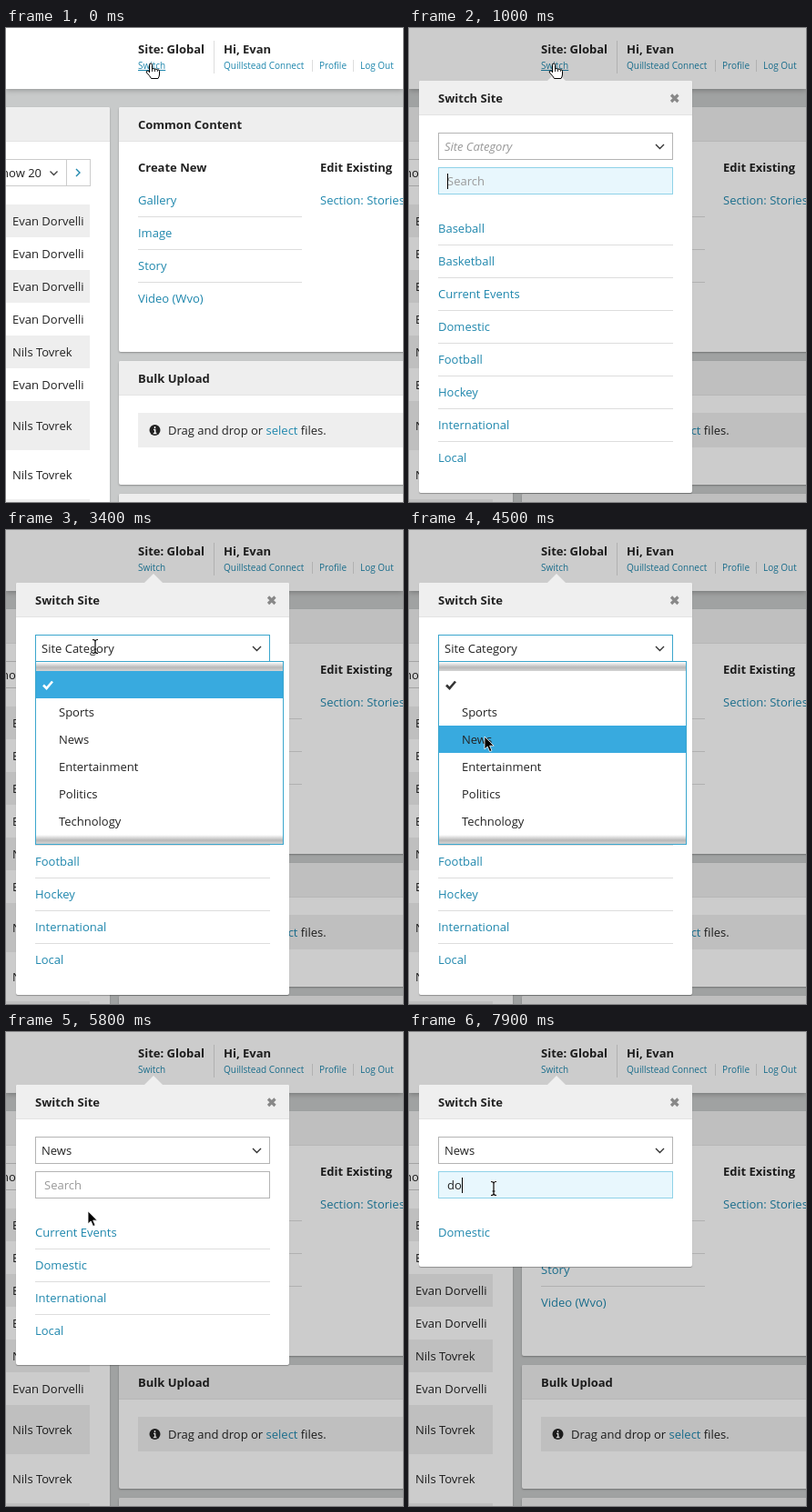
Write an HTML page that moves like this. It is 436 px wide and 521 px high and loops after 8 s.

```html
<!DOCTYPE html>
<html lang="en">
<head>
<meta charset="utf-8">
<title>Switch Site</title>
<style>
:root { --link: #1f87ad; --ink: #222; --grey: #eee; --line: #ddd; --blue: #38aadf; --pale: #e8f7fd; }
* { box-sizing: border-box; }
html, body { margin: 0; width: 100%; height: 100%; overflow: hidden; }
#stage { position: relative; width: 436px; height: 521px; overflow: hidden; background: #c8caca;
  font: 13px/18px "Open Sans", sans-serif; color: var(--ink); white-space: nowrap; }
#stage div, #stage ul, .t, svg { position: absolute; }
svg { left: 0; top: 0; overflow: visible; }
ul { margin: 0; padding: 0; list-style: none; }

/* text placed by left edge and middle line */
.t { left: calc(var(--x) * 1px); top: calc(var(--y) * 1px - 9px); }
.small { font-size: 10px; }
.link, .rows { color: var(--link); }
.rule { width: 1px; background: var(--line); }

.top { left: 0; top: 0; width: 436px; height: 67px; background: #fff; box-shadow: 0 1px 6px rgba(0,0,0,.3); }
.panel { background: #fff; border-radius: 2px; box-shadow: 0 1px 2px rgba(0,0,0,.3); overflow: hidden; }
.panel::before { content: ""; display: block; height: 37px; background: var(--grey); border-bottom: 1px solid #e4e4e4; }
.pager { top: 144px; height: 30px; border: 1px solid #ccc; background: #fff; }
.drop { left: 145px; top: 423px; width: 310px; height: 38px; background: var(--grey); }

.rows li { height: 36px; line-height: 34px; border-bottom: 1px solid var(--line); }
.rows li:last-child { border: 0; }
.people { left: -20px; top: 194px; width: 112px; }
.people li { height: 36px; line-height: 36px; padding-left: 27px; }
.people li:nth-child(odd) { background: var(--grey); }
.people li:nth-child(n+7) { height: 54px; line-height: 54px; }

.s { animation: 8s step-end infinite; }
.shade { inset: 0; background: #000; animation: shade 8s linear infinite; }
.pop { left: 11px; top: 58px; width: 300px; background: #fff; border-radius: 2px;
  box-shadow: 0 1px 1px rgba(0,0,0,.3); animation-name: pop; }
.ui { inset: 0; animation-name: ui; }
.head { left: 11px; top: 58px; width: 300px; height: 38px; background: #efefef;
  border-bottom: 1px solid #e3e3e3; border-radius: 2px 2px 0 0; }
.tip { left: 152px; top: 48px; border: 10px solid transparent; border-top: 0; border-bottom-color: #efefef; }
.field { left: 32px; width: 258px; height: 30px; border: 1px solid #b4b4b4; background: #fff; }
.sites { left: 32px; top: 203px; width: 258px; }
.glow { left: 11px; top: 203px; width: 300px; height: 35px; background: var(--pale); animation-name: glow; }

.menu { left: 32px; top: 144px; width: 273px; height: 202px; border: 1px solid #3ba6cd; background: #fff; animation-name: menu; }
.menu ul { top: 10px; width: 271px; }
.menu li { height: 30px; line-height: 30px; padding-left: 25px; }
.edge { left: 0; width: 271px; height: 10px; background: linear-gradient(#fff, #b8b8b8 60%, #d4d4d4); }
.pick { left: 0; top: 10px; width: 271px; height: 30px; background: var(--blue); animation-name: pick; }
.caret { left: 42px; top: 160px; width: 1px; height: 17px; background: #000; animation-name: caret; }
.cursor { left: 0; top: 0; animation: move 8s linear infinite; }

@keyframes shade { 0%, 1% { opacity: 0 } 3.75%, 100% { opacity: .2 } }
@keyframes pop {
  0% { visibility: hidden; height: 42px } 2.4% { visibility: visible; height: 42px }
  7.4% { visibility: visible; height: 453px } 59.9% { visibility: visible; height: 308px }
  91.1%, 100% { visibility: visible; height: 200px }
}
@keyframes close { 0% { opacity: 0 } 2.4%, 100% { opacity: 1 } }
@keyframes ui { 0% { opacity: 0 } 7.4%, 100% { opacity: 1 } }
@keyframes under { 0% { text-decoration: underline } 13%, 100% { text-decoration: none } }
@keyframes all { 0% { opacity: 1 } 59.9%, 100% { opacity: 0 } }
@keyframes news { 0% { opacity: 0 } 59.9% { opacity: 1 } 91.1%, 100% { opacity: 0 } }
@keyframes found { 0% { opacity: 0 } 91.1%, 100% { opacity: 1 } }
@keyframes glow { 0% { opacity: 0 } 59.9% { opacity: 1 } 71.1%, 100% { opacity: 0 } }
@keyframes select { 0% { border-color: #b4b4b4 } 34.9% { border-color: #3ba6cd } 57.4%, 100% { border-color: #b4b4b4 } }
@keyframes focus {
  0% { background: var(--pale); border-color: #8fd2e8 } 34.9% { background: #fff; border-color: #b4b4b4 }
  79.9%, 100% { background: var(--pale); border-color: #8fd2e8 }
}
@keyframes hint { 0% { opacity: 1; font-style: italic; color: #999 } 34.9% { opacity: 1; font-style: normal; color: #222 } 57.4%, 100% { opacity: 0 } }
@keyframes value { 0% { opacity: 0 } 57.4%, 100% { opacity: 1 } }
@keyframes menu { 0% { opacity: 0 } 36.1% { opacity: 1 } 57.4%, 100% { opacity: 0 } }
@keyframes pick { 0% { top: 10px } 49.9% { top: 40px } 52.4%, 100% { top: 70px } }
@keyframes tick { 0% { stroke: #fff } 49.9%, 100% { stroke: #333 } }
@keyframes prompt { 0% { opacity: 1 } 86.1%, 100% { opacity: 0 } }
@keyframes d { 0% { opacity: 0 } 86.1%, 100% { opacity: 1 } }
@keyframes o { 0% { opacity: 0 } 88.6%, 100% { opacity: 1 } }
@keyframes caret {
  0% { opacity: 1; left: 42px } 13.7% { opacity: 0; left: 42px } 20% { opacity: 1; left: 42px }
  26.2% { opacity: 0; left: 42px } 32.5% { opacity: 1; left: 42px } 34.9% { opacity: 0; left: 42px }
  79.9% { opacity: 1; left: 42px } 86.1% { opacity: 1; left: 50px } 88.6%, 100% { opacity: 1; left: 58px }
}
@keyframes move {
  0% { transform: translate(159px, 39px) }
  12.5% { transform: translate(159px, 39px); animation-timing-function: ease-in-out }
  25% { transform: translate(93px, 167px) }
  28.75% { transform: translate(93px, 167px); animation-timing-function: ease-in-out }
  33.75% { transform: translate(98px, 128px) }
  45.6% { transform: translate(98px, 128px); animation-timing-function: ease-in-out }
  54% { transform: translate(83px, 227px) }
  68.75% { transform: translate(83px, 227px); animation-timing-function: ease-in }
  72.5% { transform: translate(90px, 197px); animation-timing-function: ease-out }
  76.25%, 100% { transform: translate(93px, 172px) }
}
@keyframes hand { 0% { opacity: 1 } 13% { opacity: 0 } 58.7% { opacity: 1 } 71.1%, 100% { opacity: 0 } }
@keyframes arrow {
  0% { opacity: 0 } 13% { opacity: 1 } 33% { opacity: 0 } 46.1% { opacity: 1 }
  58.7% { opacity: 0 } 71.1% { opacity: 1 } 75.6%, 100% { opacity: 0 }
}
@keyframes beam {
  0% { opacity: 0 } 33% { opacity: 1 } 46.1% { opacity: 0 } 75.6% { opacity: 1 }
  85.5% { opacity: 0 } 96.1%, 100% { opacity: 1 }
}
</style>
</head>
<body>
<div id="stage">
  <div class="panel" style="left:-20px;top:87px;width:134px;height:460px"></div>
  <div class="panel" style="left:124px;top:87px;width:340px;height:269px"></div>
  <div class="panel" style="left:124px;top:366px;width:340px;height:136px"></div>
  <div class="panel" style="left:124px;top:512px;width:340px;height:60px"></div>

  <div class="pager" style="left:-30px;width:97px"></div>
  <div class="pager" style="left:66px;width:27px"></div>
  <span class="t" style="--y:159;right:397px">Show 20</span>
  <ul class="people">
    <li>Evan Dorvelli<li>Evan Dorvelli<li>Evan Dorvelli<li>Evan Dorvelli
    <li>Nils Tovrek<li>Evan Dorvelli<li>Nils Tovrek<li>Nils Tovrek<li>
  </ul>

  <b class="t" style="--x:145;--y:106">Common Content</b>
  <b class="t" style="--x:145;--y:153">Create New</b>
  <b class="t" style="--x:345;--y:153">Edit Existing</b>
  <ul class="rows" style="left:145px;top:172px;width:180px">
    <li>Gallery<li>Image<li>Story<li>Video (Wvo)
  </ul>
  <span class="t link" style="--x:345;--y:189">Section: Stories</span>
  <b class="t" style="--x:145;--y:385">Bulk Upload</b>
  <div class="drop"></div>
  <span class="t" style="--x:178;--y:442">Drag and drop or <span class="link">select</span> files.</span>

  <div class="top">
    <b class="t" style="--x:145;--y:23">Site: Global</b>
    <span class="t small link s" style="--x:145;--y:41;animation-name:under">Switch</span>
    <div class="rule" style="left:228px;top:14px;height:36px"></div>
    <b class="t" style="--x:239;--y:23">Hi, Evan</b>
    <span class="t small link" style="--x:239;--y:41">Quillstead Connect</span>
    <div class="rule" style="left:336px;top:35px;height:13px"></div>
    <span class="t small link" style="--x:344;--y:41">Profile</span>
    <div class="rule" style="left:381px;top:35px;height:13px"></div>
    <span class="t small link" style="--x:389;--y:41">Log Out</span>
  </div>
  <svg width="436" height="521" fill="none" stroke-width="1.4">
    <path d="M48.5 157.500l4 4 4-4" stroke="#444"/>
    <path d="M77 155l4 4-4 4" stroke="#1f87ad"/>
    <circle cx="163.500" cy="442" r="6" fill="#222"/>
    <path d="M163.500 438v2M162 441.500h1.700v4M161.800 445.500h3.600" stroke="#fff"/>
  </svg>

  <div class="shade"></div>
  <div class="pop s"></div>
  <div class="ui s">
    <div class="tip"></div>
    <div class="head"></div>
    <b class="t" style="--x:32;--y:77">Switch Site</b>
    <div class="field s" style="top:115px;animation-name:select"></div>
    <span class="t s" style="--x:39;--y:130;animation-name:hint">Site Category</span>
    <span class="t s" style="--x:39;--y:130;animation-name:value">News</span>
    <div class="field s" style="top:153px;animation-name:focus"></div>
    <span class="t s" style="--x:42;--y:168;color:#999;animation-name:prompt">Search</span>
    <span class="t" style="--x:42;--y:168"><span class="s" style="animation-name:d">d</span><span class="s" style="animation-name:o">o</span></span>
    <div class="caret s"></div>
    <svg width="436" height="521" fill="none"><path d="M271 128l4.500 4.500 4.500-4.500" stroke="#333" stroke-width="1.400"/></svg>

    <div class="glow s"></div>
    <ul class="rows sites s" style="animation-name:all">
      <li>Baseball<li>Basketball<li>Current Events<li>Domestic<li>Football<li>Hockey<li>International<li>Local
    </ul>
    <ul class="rows sites s" style="animation-name:news">
      <li>Current Events<li>Domestic<li>International<li>Local
    </ul>
    <ul class="rows sites s" style="animation-name:found"><li>Domestic</ul>

    <div class="menu s">
      <div class="edge" style="top:0"></div>
      <div class="pick s"></div>
      <ul><li><li>Sports<li>News<li>Entertainment<li>Politics<li>Technology</ul>
      <div class="edge" style="bottom:0"></div>
      <svg width="30" height="40" fill="none"><path class="s" style="animation-name:tick" d="M8 25.500l3.500 3.500 6.500-7.500" stroke-width="2.600"/></svg>
    </div>
  </div>
  <svg class="s" style="animation-name:close" width="436" height="521"><path d="M288 73.500l7.500 7.500m0-7.500l-7.500 7.500" stroke="#888" stroke-width="3.200"/></svg>

  <div class="cursor">
    <svg class="s" style="animation-name:hand" width="1" height="1" fill="#fff" stroke="#000">
      <path d="M-1.500 10V1.500a1.500 1.500 0 0 1 3 0V6q1.500-1.200 3 .4 1.600-1 2.800.5 2-.6 2.200 1.300V12q0 2-1.500 4.500H.5Q-1 13.500-4.600 10q-.8-1.600.8-2 1.200 0 2.300 1.600z"/>
      <path d="M1.500 6v3M4.500 6.500V9M7.300 7v2" stroke-width=".8"/>
    </svg>
    <svg class="s" style="animation-name:arrow" width="1" height="1">
      <path d="M0 0V14l3.200-3 2.400 5.600 2.400-1-2.400-5.400h4.600z" stroke="#fff" stroke-width=".8"/>
    </svg>
    <svg class="s" style="animation-name:beam" width="1" height="1" fill="none">
      <path id="bar" d="M-3-7.500q3 0 3 2 0-2 3-2M0-5.500V5.500M-3 7.500q3 0 3-2 0 2 3 2M-1.500 3h3" stroke="#fff" stroke-width="2.400"/>
      <path d="M-3-7.500q3 0 3 2 0-2 3-2M0-5.500V5.500M-3 7.500q3 0 3-2 0 2 3 2M-1.500 3h3" stroke="#000" stroke-width="1.200"/>
    </svg>
  </div>
</div>
</body>
</html>
```
